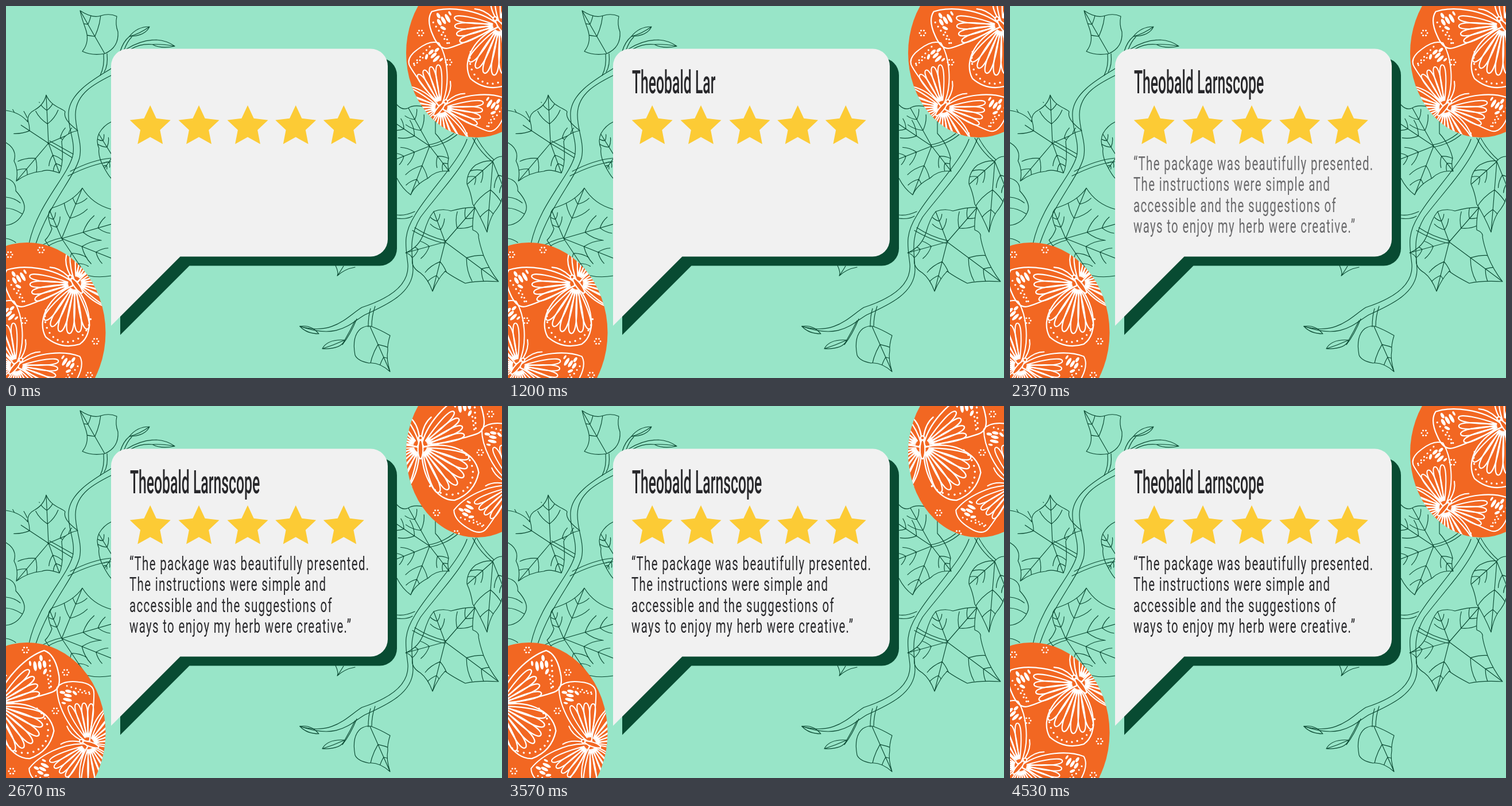
An HTML page for the animation above (4.65 s loop, 864 by 648 pixels).

```html
<!DOCTYPE html>
<html lang="en">
<head>
<meta charset="utf-8">
<title>Review</title>
<style>
html, body { margin: 0; width: 100%; height: 100%; overflow: hidden; background: #98e5c8; }
svg { display: block; width: 864px; height: 648px; }
.vine { fill: none; stroke: #0b4a33; stroke-width: 1.15; stroke-linecap: round; stroke-linejoin: round; }
.wing { fill: none; stroke: #fff; stroke-width: 2.1; stroke-linecap: round; stroke-linejoin: round; }
.wing .dot, .flower { fill: #fff; stroke: none; }
text { font-family: Roboto, "Liberation Sans", sans-serif; fill: #28282b; white-space: pre; }
#name { font-size: 55px; font-weight: 500; }
#quote { font-size: 33px; letter-spacing: 2.15px; }
</style>
</head>
<body>
<svg id="stage" viewBox="0 0 864 648"></svg>
<script>
const LOOP = 4650;
const NAME = "Theobald Larnscope";
const QUOTE = [
  "“The package was beautifully presented.",
  "The instructions were simple and",
  "accessible and the suggestions of",
  "ways to enjoy my herb were creative.”"
];
const BUBBLE = "M213 74.5H635a30 30 0 0 1 30 30V406.5a30 30 0 0 1-30 30H303.5L183 557V104.5a30 30 0 0 1 30-30z";

const path = (d, attrs = "") => `<path d="${d}" ${attrs}/>`;
const range = (n, f) => Array.from({ length: n }, (_, i) => f(i)).join("");
const fix = n => n.toFixed(1);

// Stems and small leaves without a vein system
const stems = [
  "M183 109C160 124 112 148 109 185C107 215 122 235 116 262C105 300 55 345 40 414",
  "M183 121C155 135 122 152 121 188C120 215 134 238 128 265C118 300 75 345 52 414",
  "M112 288Q150 268 183 265M108 296Q150 275 183 271",
  "M170 84Q172 105 164 121M176 83Q178 104 171 115",
  "M199 79Q204 62 215 53M206 76Q211 62 219 54",
  "M215 53Q228 36 250 36Q243 52 215 53Q232 49 250 36",
  "M210 75Q235 59 262 59Q280 60 294 70Q270 75 255 67Q235 65 218 75M255 67Q272 66 294 70",
  "M72 238Q96 252 115 264M76 235Q96 246 117 258",
  "M0 300Q18 305 17 322Q38 345 30 360Q20 380 0 382M0 333Q14 334 25 343M0 352Q12 352 28 362",
  "M0 405Q9 406 17 412M96 404Q76 408 56 421M98 408Q80 412 64 425",
  "M803 232C790 270 735 325 712 365C690 400 697 420 700 450C703 490 660 512 620 525C595 540 570 575 512 558",
  "M818 230C800 280 750 330 722 368C700 405 708 430 709 460C708 500 665 520 625 538C600 552 580 582 512 558",
  "M512 558Q532 555 545 571Q524 571 512 558",
  "M551 597Q560 580 590 582Q584 598 551 597Q570 591 590 582Q600 565 608 548M586 590Q600 572 611 545",
  "M637 558Q637 540 643 523M631 559Q631 540 635 527",
  "M574 452Q580 465 577 470Q590 458 608 455M577 470Q584 460 588 453",
  "M681 364Q695 366 712 358M681 370Q698 372 708 366",
  "M788 222Q768 240 738 246M780 222Q762 237 736 242",
  "M765 414Q735 407 708 391M767 409Q738 403 712 386",
  "M813 230Q826 255 847 271M820 230Q832 252 850 268"
];

// Each leaf: outline, vein hub, vein ends
const leaves = [
  ["M129 8Q150 22 165 17T193 18Q190 32 195 45Q197 72 172 83Q150 87 133 79Q147 62 138 38Q132 22 129 8", [172, 83], [[129, 8]]],
  ["M70 155C78 175 98 178 103 184C100 194 108 204 125 217Q102 222 97 236Q101 274 93 291Q72 283 62 288Q38 290 18 305Q22 285 14 270Q20 250 0 238M0 182Q24 185 38 202Q36 188 50 181Q66 172 70 155",
    [74, 239], [[70, 155], [125, 217], [93, 291], [18, 305], [-8, 185]]],
  ["M183 354Q150 345 133 317Q118 340 80 352Q68 362 80 388Q76 400 68 408Q84 434 104 438Q114 455 140 469Q160 474 183 470",
    [97, 405], [[133, 317], [190, 378], [185, 440], [140, 469], [76, 356]]],
  ["M183 202Q170 208 162 222Q156 235 162 248Q160 262 170 280Q178 295 183 300", [186, 262], [[161, 222], [170, 285]]],
  ["M681 172Q690 182 700 178Q715 168 748 182V222Q765 240 771 265Q768 278 772 288Q750 285 735 300Q712 312 705 329Q690 318 681 300",
    [738, 244], [[700, 176], [672, 200], [672, 270], [705, 329], [772, 288]]],
  ["M745 358Q760 352 775 357Q800 350 817 351Q812 370 813 390Q825 395 823 402Q825 415 832 435Q842 460 858 480Q820 478 800 483Q775 470 765 462Q752 475 743 497Q735 475 722 465Q705 455 708 440Q705 432 696 430Q720 420 728 395Q735 370 745 358",
    [765, 411], [[817, 351], [858, 480], [743, 497], [696, 430], [745, 358]]],
  ["M864 262Q855 262 848 270Q835 268 818 277Q802 290 803 310Q810 325 813 345Q826 365 838 394Q842 372 850 360Q862 345 864 335",
    [848, 271], [[838, 394], [804, 310], [872, 330]]],
  ["M636 558Q650 563 669 574Q664 590 665 600Q662 615 669 637Q650 620 632 622Q612 618 608 608Q602 575 618 562Q628 556 636 558",
    [634, 558], [[669, 637]]]
];

// Side veins sweep outwards; a leaf with one main vein has longer ones
function veins([hx, hy], ends) {
  const reach = ends.length > 1 ? .45 : .8;
  return ends.map(([x, y]) => {
    const dx = x - hx, dy = y - hy, len = Math.hypot(dx, dy), dir = Math.atan2(dy, dx);
    let d = `M${hx} ${hy}L${x} ${y}`;
    for (const t of [.4, .68]) for (const side of [-1, 1]) {
      const r = len * reach * (1.2 - t);
      const point = (size, turn) => fix(size * Math.cos(dir + side * turn)) + " " + fix(size * Math.sin(dir + side * turn));
      d += `M${fix(hx + dx * t)} ${fix(hy + dy * t)}q${point(r * .55, .95)} ${point(r, .7)}`;
    }
    return d;
  }).join("");
}

const leaf = ([d, hub, ends], i) =>
  `<clipPath id="leaf${i}">${path(d)}</clipPath>` + path(d) + path(veins(hub, ends), `clip-path="url(#leaf${i})"`);

const dot = (x, y, rx, ry = rx, turn = 0) =>
  `<ellipse class="dot" rx="${rx}" ry="${ry}" transform="translate(${fix(x)} ${fix(y)}) rotate(${turn})"/>`;

const petal = (from, to, width, turn) => {
  const bend = from + (to - from) * .45;
  return path(`M${from} 0C${bend} ${-width} ${to} ${-width * 1.5} ${to} 0C${to} ${width * 1.5} ${bend} ${width} ${from} 0Z`,
    `transform="rotate(${fix(turn)})"`);
};

// Wings are drawn along +x from the body, then turned into place
const upperWing = path("M4 -2C35 -28 85 -34 112 -26Q122 -12 111 14Q101 40 84 35C55 27 30 14 4 4Z") +
  range(4, i => petal(12, 76 - i * 1.5, 5.4, -11 + i * 10.5)) +
  range(3, i => dot(86 + i * 7, -14 + i * 3, 2.8, 8 - i, 28)) +
  dot(101, -19, 2.6, 5, 28) + dot(94, 2, 5, 2.4, -30) + dot(82, -22, 1.8, 4, 28) +
  range(6, i => dot(110 - i * 4.4, -8 + i * 7, 1.6)) + range(4, i => dot(94 - i * 3, 9 + i * 6, 1.5));

const lowerWing = path("M3 0C25 -34 70 -52 97 -29Q113 0 97 29C75 50 30 34 3 0Z") +
  range(6, i => petal(11, 85 - Math.abs(i - 2.5) * 2.5, 6.3, -27.5 + i * 11)) +
  range(15, i => {
    const a = -1.6 + i * .23;
    return dot(55 + 44 * Math.cos(a), 38 * Math.sin(a), 1.6);
  });

const halfWings = `<g transform="rotate(-35)">${upperWing}</g><g transform="rotate(41)">${lowerWing}</g>`;
const butterfly = `<g id="butterfly" class="wing">${halfWings}<g transform="scale(-1 1)">${halfWings}</g>` +
  `<ellipse cy="5" rx="4" ry="15" fill="#f26722"/><circle cy="-13" r="3.2" fill="#f26722"/>` +
  path("M-2 -16Q-5 -36 -17 -46M2 -16Q5 -36 17 -46") + `</g>`;

const fly = (x, y, turn, size) => `<use href="#butterfly" transform="translate(${x} ${y}) rotate(${turn}) scale(${size})"/>`;
const flower = ([x, y]) => `<g class="flower">` + range(6, i => {
  const a = i * Math.PI / 3;
  return `<circle cx="${fix(x + 5 * Math.cos(a))}" cy="${fix(y + 5 * Math.sin(a))}" r="1.5"/>`;
}) + `</g>`;

const prints = [
  fly(120, 483, -37, 1.05) + fly(18, 626, 40, .97) +
    [[6, 433], [61, 425], [31, 548], [156, 584], [145, 643], [-18, 497]].map(flower).join(""),
  fly(-18, 520, 0, 1.1) + fly(143, 588, -71, .97) +
    [[34, 425], [104, 464], [86, 531], [10, 636], [44, 672]].map(flower).join("")
];

const egg = (id, cx, cy, rx, ry, dx, dy) => {
  const shape = `<ellipse cx="${cx}" cy="${cy}" rx="${rx}" ry="${ry}"`;
  return `<clipPath id="${id}">${shape}/></clipPath>${shape} fill="#f26722"/>` +
    `<g clip-path="url(#${id})">` +
    prints.map((p, i) => `<g class="print${i}" transform="translate(${dx} ${dy})">${p}</g>`).join("") + `</g>`;
};

const star = cx => `<polygon fill="#fccb35" points="${range(10, i => {
  const r = i % 2 ? 18 : 37.3, a = (i * 36 - 90) * Math.PI / 180;
  return `${fix(cx + r * Math.cos(a))},${fix(210.3 + r * Math.sin(a))} `;
})}"/>`;

const stage = document.getElementById("stage");
stage.innerHTML = `<defs>${butterfly}</defs><rect width="864" height="648" fill="#98e5c8"/>` +
  `<g class="vine">${stems.map(d => path(d)).join("")}${leaves.map(leaf).join("")}</g>` +
  egg("eggLeft", 37, 569, 136.5, 157, 0, 0) +
  egg("eggRight", 820, 82, 123, 147, 740, -450) +
  path(BUBBLE, `fill="#084b32" transform="translate(16 16)"`) + path(BUBBLE, `fill="#f1f1f1"`) +
  [251.2, 336, 421, 504.7, 588.3].map(star).join("") +
  `<text id="name" transform="translate(216 152) scale(.45 1)"></text>` +
  `<g id="quote" transform="translate(215 286) scale(.62 1)">` +
  QUOTE.map((line, i) => `<text y="${i * 36.5}">${line}</text>`).join("") + `</g>`;

const nameText = document.getElementById("name");
const quote = document.getElementById("quote");
const show = (kind, on) => stage.querySelectorAll(kind).forEach(g => g.style.display = on ? "" : "none");

function draw(t) {
  nameText.textContent = NAME.slice(0, Math.floor(t / 100));
  quote.style.opacity = Math.min(1, Math.max(0, (t - 1800) / 850));
  const turned = t % 900 >= 630;
  show(".print0", !turned);
  show(".print1", turned);
}

const start = performance.now();
function tick() {
  draw((performance.now() - start) % LOOP);
  requestAnimationFrame(tick);
}
tick();
</script>
</body>
</html>
```
